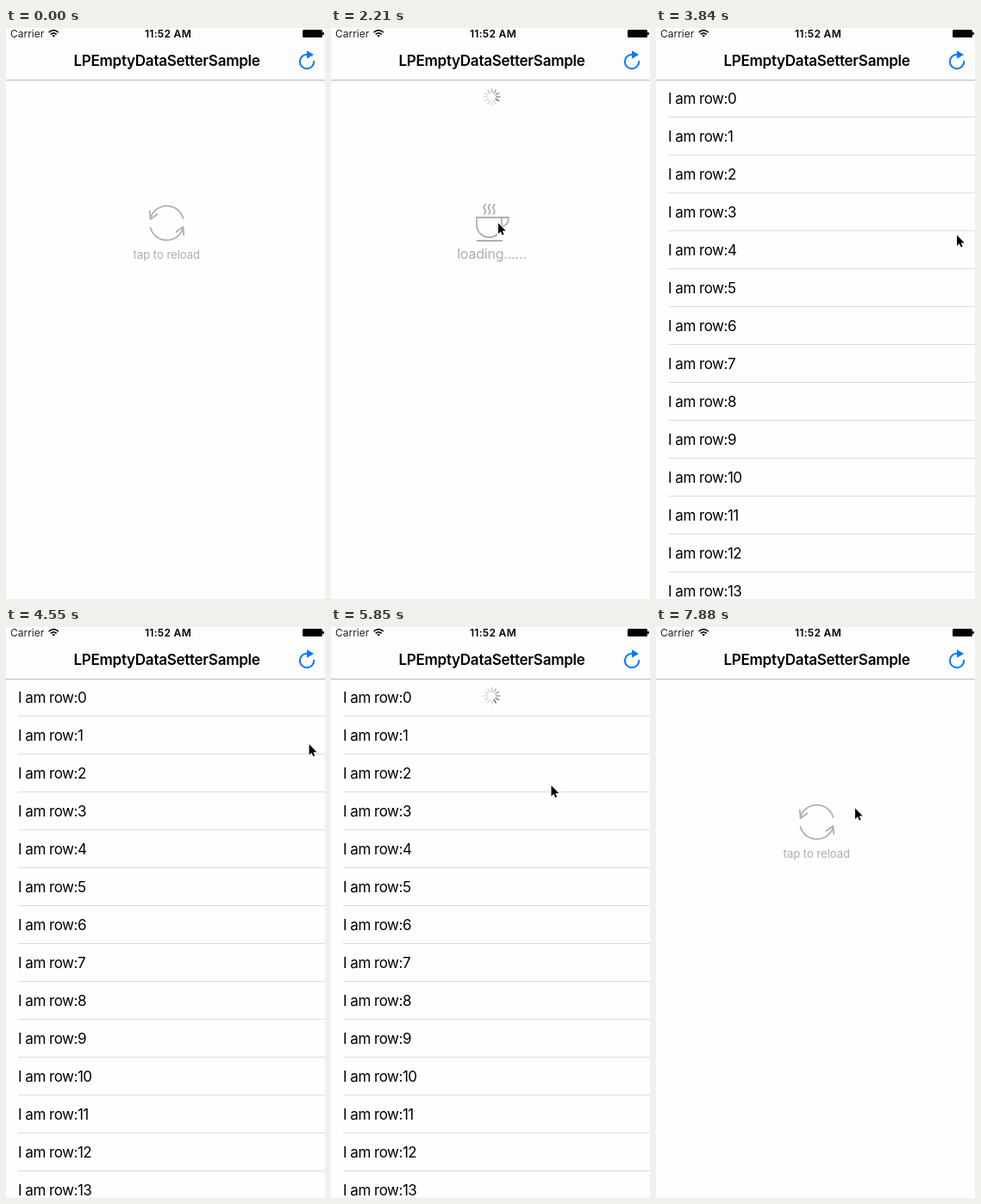
Animation, 370 px wide and 663 px high, one loop 7990 ms. Source, as an HTML page:

```html
<!DOCTYPE html>
<html lang="en">
<head>
<meta charset="utf-8">
<title>Empty data set demo</title>
<style>
  html, body { margin: 0; width: 100%; height: 100%; overflow: hidden; background: #fefefe; }
  svg { display: block; width: 370px; height: 663px; font-family: Inter, sans-serif; }
  .icon { fill: none; stroke: #b0b0b0; stroke-width: 1.8; stroke-linecap: round; stroke-linejoin: round; }
  .hint { fill: #adadad; text-anchor: middle; }
  .row { font-size: 17px; letter-spacing: -.5px; }
  .status { font-size: 12px; }
  .bold { font-weight: 600; text-anchor: middle; }
</style>
</head>
<body>
<svg viewBox="0 0 370 663">
  <defs>
    <path id="halfArrow" d="M167.3 221.5A19.8 19.8 0 0 1 205.5 221M166.8 212.5L167.6 222L175.5 216.3"/>
    <path id="steam" d="M179 205q-3 3 -.8 5.5t-.4 5.5"/>
  </defs>

  <rect width="370" height="60" fill="#fdfdfd"/>
  <rect y="60" width="370" height="1" fill="#bcbcbc"/>
  <text class="status" x="5" y="10.5" fill="#222">Carrier</text>
  <path d="M49.6 5.2Q55.2 0.2 60.8 5.2M51.8 7.5Q55.2 4.4 58.6 7.5" fill="none" stroke="#111" stroke-width="1.7"/>
  <path d="M53.4 8.7Q55.2 7.2 57 8.7L55.2 10.7Z" fill="#111"/>
  <text class="status bold" x="188" y="10.5" letter-spacing=".3">11:52 AM</text>
  <rect x="344" y="2" width="23" height="9" rx="1.5"/>
  <rect x="367" y="5" width="2" height="3" rx="1"/>
  <text class="bold" x="186.5" y="44" font-size="17" letter-spacing="-.25">LPEmptyDataSetterSample</text>
  <g id="refresh">
    <path d="M349.5 30.8A8.2 8.2 0 1 0 357.2 38.2" fill="none" stroke="#007aff" stroke-width="2"/>
    <path d="M349 26.2L357 31L349 35.8Z" fill="#007aff"/>
  </g>

  <g id="empty">
    <g class="icon">
      <use href="#halfArrow"/>
      <use href="#halfArrow" transform="rotate(180 186.5 226.5)"/>
    </g>
    <text class="hint" x="186.3" y="267.5" font-size="13">tap to reload</text>
  </g>

  <g id="loading">
    <g class="icon">
      <path d="M169 220H198V228.5A14.5 14.5 0 0 1 169 228.5ZM198 220H206Q206 230 197.5 230.5M169.5 247H198.5"/>
      <use href="#steam"/>
      <use href="#steam" x="5.3"/>
      <use href="#steam" x="10.6"/>
    </g>
    <text class="hint" x="186.5" y="267.5" font-size="16" letter-spacing="-.2">loading......</text>
  </g>

  <g id="table"></g>
  <g id="spinner" stroke="#777" stroke-width="1.7" stroke-linecap="round"></g>

  <g id="cursor">
    <path d="M.5 .5V13L3.4 10.3L5.2 14.6L7.1 13.8L5.3 9.6H9.2Z" stroke="#fff" stroke-width="2" paint-order="stroke"/>
  </g>
</svg>
<script>
const LOOP = 7990, TICK = 116.9, APPEAR = 480;
const $ = id => document.getElementById(id);
const show = (id, on) => $(id).style.display = on ? "" : "none";
const clamp = v => Math.max(0, Math.min(1, v));
const ease = u => u * u * (3 - 2 * u);

// Pointer moves: when they start and end, and where they go
const moves = [
  { from: 480, to: 590, x: 246, y: 155 },
  { from: 960, to: 1420, x: 193.5, y: 226 },
  { from: 2320, to: 3140, x: 364.5, y: 242 },
  { from: 3380, to: 3840, x: 348.5, y: 240 },
  { from: 4210, to: 4910, x: 353.5, y: 41 },
  { from: 5150, to: 5850, x: 255, y: 183.5 },
  { from: 7650, to: 7840, x: 230.5, y: 210 }
];

// `up` is a moment when the spinner's head points straight up
const loads = [
  { from: 1630, to: 3720, up: 2870 },
  { from: 5030, to: 7160, up: 4400 }
];

for (let y = 88, i = 0; i < 14; i++, y += 44)
  $("table").innerHTML += `<text class="row" x="14" y="${y}">I am row:${i}</text>
    <rect x="14" y="${y + 15}" width="356" height="1" fill="#dddde0"/>`;

for (let i = 0; i < 12; i++)
  $("spinner").innerHTML += `<path d="M186.5 74.8V70.8" transform="rotate(${i * 30} 186.5 80)"/>`;

function pointerAt(t) {
  let x = 274, y = 155;
  for (const m of moves) {
    const k = ease(clamp((t - m.from) / (m.to - m.from)));
    x += (m.x - x) * k;
    y += (m.y - y) * k;
  }
  return [x, y];
}

function draw(now) {
  const t = now % LOOP;
  const tick = APPEAR + Math.floor((t - APPEAR + 40) / TICK) * TICK;
  const load = loads.find(l => t >= l.from && t < l.to);
  const filled = t >= loads[0].to && t < loads[1].to;

  show("table", filled);
  show("loading", load && !filled);
  show("empty", !load && !filled);
  show("spinner", load);
  if (load) {
    const head = Math.round((tick - load.up) / 1000 * 12);
    [...$("spinner").children].forEach((spoke, i) => {
      const age = ((head - i) % 12 + 12) % 12;
      spoke.style.opacity = Math.max(.25, .95 - age * .12);
    });
  }

  // The button dims on press, then fades back after release
  const pressed = t >= 4910 && t < 5300;
  $("refresh").style.opacity = pressed ? .25 + .75 * clamp((tick - 5030) / 260) : 1;

  show("cursor", t >= APPEAR);
  $("cursor").setAttribute("transform", `translate(${pointerAt(tick)})`);
  requestAnimationFrame(draw);
}
requestAnimationFrame(draw);
</script>
</body>
</html>
```
